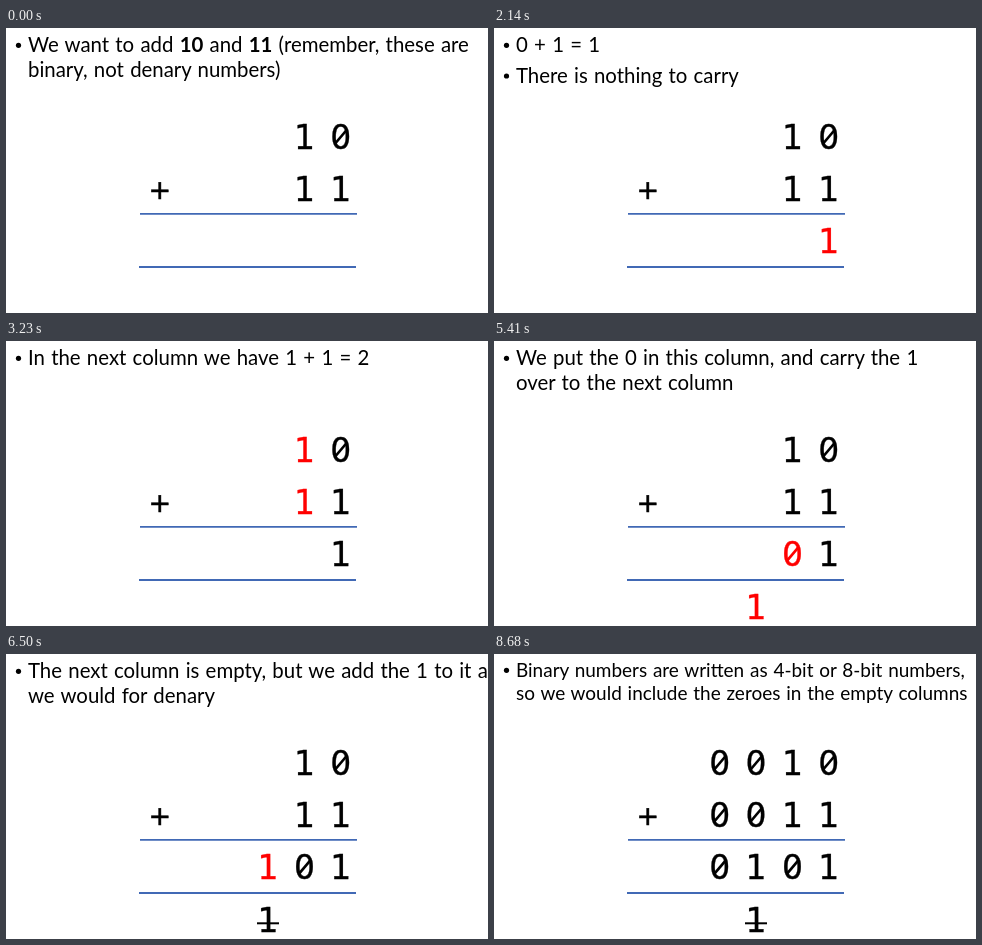
Write an HTML page that moves like this. It is 482 px wide and 285 px high and loops after 9.77 s.

```html
<!DOCTYPE html>
<html lang="en">
<head>
<meta charset="utf-8">
<title>Binary addition</title>
<style>
  html, body { margin: 0; width: 100%; height: 100%; overflow: hidden; background: #fff; }
  svg { display: block; width: 482px; height: 285px; }
  .note { font-family: Calibri, Carlito, Lato, sans-serif; word-spacing: .05em; }
  .mono { font-family: "DejaVu Sans Mono", monospace; font-size: .96em; }
  .digit, .sign { font: 33px "DejaVu Sans", sans-serif; text-anchor: middle; stroke-width: .3px; }
  .sign { font-size: 27px; stroke-width: .5px; }
</style>
</head>
<body>
<svg id="stage" viewBox="0 0 482 285"></svg>
<script>
const LOOP = 9770;
const STEP = 1090;
const FIRST = 1050;
const RED = '#ff0000', BLUE = '#0070c0', BLACK = '#000', RULE = '#4169b5';
const ROWS = [121, 173, 225.3, 277.6];

// Each note is one bullet, given as its wrapped lines.
// "red" lists the highlighted cells as row-column pairs, columns counted from the right.
const scenes = [
  { notes: [['We want to add <tspan font-weight="700">10</tspan> and <tspan font-weight="700">11</tspan> (remember, these are',
             'binary, not denary numbers)']], rows: ['10', '11'] },
  { notes: [['Starting from the right, we add the first column']], rows: ['10', '11'], red: ['0-0', '1-0'] },
  { notes: [['0 + 1 = 1'], ['There is nothing to carry']], rows: ['10', '11', '1'], red: ['2-0'] },
  { notes: [['In the next column we have 1 + 1 = 2']], rows: ['10', '11', '1'], red: ['0-1', '1-1'] },
  { notes: [['Remember, we can’t have a number bigger than 1'],
            ['2 in binary is <tspan class="mono">10</tspan>']], rows: ['10', '11', '1'], red: ['0-1', '1-1'] },
  { notes: [['We put the 0 in this column, and carry the 1', 'over to the next column']],
    rows: ['10', '11', '01', '1  '], red: ['2-1', '3-2'] },
  { notes: [['The next column is empty, but we add the 1 to it as', 'we would for denary']],
    rows: ['10', '11', '101', '1  '], red: ['2-2'], strike: true },
  { notes: [['The sum is complete!'], ['We can check our answer by converting to denary']],
    rows: ['10', '11', '101', '1  '], strike: true, check: ['2', '3', '5'] },
  { notes: [['Binary numbers are written as 4-bit or 8-bit numbers,',
             'so we would include the zeroes in the empty columns']],
    rows: ['0010', '0011', '0101', '1  '], strike: true, scale: 0.93 }
];

const line = (x1, y1, x2, y2, color, width) =>
  `<line x1="${x1}" y1="${y1}" x2="${x2}" y2="${y2}" stroke="${color}" stroke-width="${width}"/>`;

const glyph = (kind, char, x, y, color = BLACK) =>
  `<text class="${kind}" x="${x}" y="${y}" fill="${color}" stroke="${color}">${char}</text>`;

function digit(char, x, y, color) {
  const slash = char === '0' ? line(x - 5.5, y - 5.5, x + 5.5, y - 18.5, color, 2.7) : '';
  return glyph('digit', char, x, y, color) + slash;
}

const sign = (char, x, row, color) => glyph('sign', char, x, ROWS[row] - 2.2, color);

function drawNotes(notes, scale = 1) {
  const size = 20.4 * scale;
  return notes.map((lines, i) => {
    const top = (scale < 1 ? 23 : 24) + i * 30.7;
    const text = lines.map((words, j) =>
      `<text class="note" font-size="${size}" x="22" y="${top + j * 24.6 * scale}">${words}</text>`);
    return `<circle cx="12.5" cy="${top - 6.7}" r="2.6"/>` + text.join('');
  }).join('');
}

function drawRow(chars, row, red = []) {
  return [...chars].reverse().map((char, col) => char === ' ' ? '' :
    digit(char, 334.7 - 36.3 * col, ROWS[row], red.includes(`${row}-${col}`) ? RED : BLACK)).join('');
}

function drawScene({ notes, rows, red, strike, check = [], scale }) {
  return drawNotes(notes, scale)
    + rows.map((chars, row) => drawRow(chars, row, red)).join('')
    + sign('+', 153.7, 1)
    + line(134, 185.9, 351, 185.9, RULE, 1.6)
    + line(133, 239, 350, 239, RULE, 2)
    + (strike ? line(251, 269.3, 273, 269.3, BLACK, 2) : '')
    + check.map((value, row) =>
        sign('=', 374, row, BLUE) + glyph('digit', value, 416.5, ROWS[row], BLUE)).join('');
}

const stage = document.getElementById('stage');
let shown = -1;

function render(time) {
  const t = time % LOOP;
  const index = t < FIRST ? 0 : Math.min(scenes.length - 1, 1 + Math.floor((t - FIRST) / STEP));
  if (index !== shown) {
    stage.innerHTML = drawScene(scenes[index]);
    shown = index;
  }
}

const start = performance.now();
function tick() {
  render(performance.now() - start);
  requestAnimationFrame(tick);
}
tick();
</script>
</body>
</html>
```
